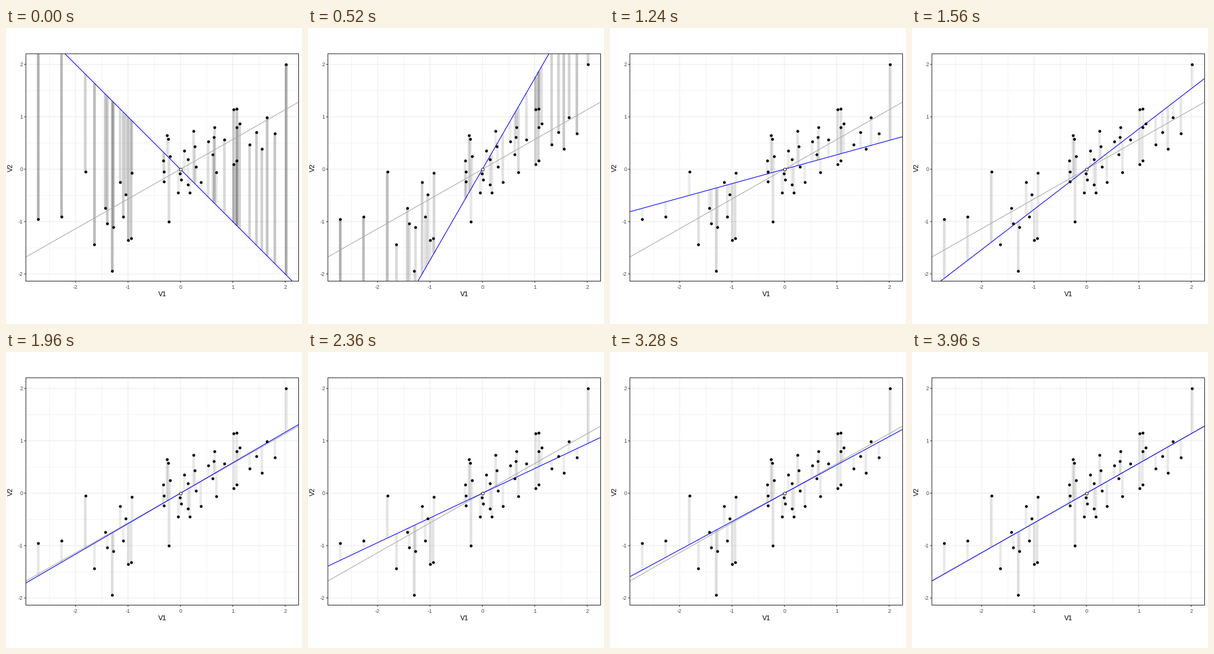
Recreate the animation shown at these times as a matplotlib script. Size 480 by 480 pixels, loop 4 s.

```python
import numpy as np
import matplotlib.pyplot as plt
from matplotlib.animation import FuncAnimation
from matplotlib.collections import LineCollection
from matplotlib.patches import Rectangle

SIZE, DPI = 480, 72          # one point equals one pixel
FRAMES, STEP = 100, 40
UNIT = 84.95                 # pixels per data unit
X0, Y0 = 282.8, 229.0        # pixel position of the origin
LEFT, RIGHT, TOP, BOTTOM = 32.2, 474.5, 41.8, 410.5
FIT = 0.568                  # least squares slope

x = np.array([
    -2.713, -2.270, -1.816, -1.640, -1.436, -1.395, -1.301, -1.277, -1.151,
    -1.090, -1.044, -0.995, -0.942, -0.924, -0.331, -0.315, -0.313, -0.257,
    -0.231, -0.218, -0.200, -0.039, -0.009, 0.012, 0.073, 0.144, 0.144,
    0.179, 0.252, 0.275, 0.291, 0.388, 0.529, 0.620, 0.642, 0.653, 0.687,
    0.840, 1.017, 1.015, 1.068, 1.079, 1.079, 1.129, 1.321, 1.453, 1.553,
    1.656, 1.803, 2.019])
y = np.array([
    -0.957, -0.910, -0.047, -1.442, -0.742, -1.032, -1.940, -1.107, -0.250,
    -0.903, -0.483, -1.354, -1.324, -0.065, 0.160, -0.045, -0.235, 0.645,
    0.579, -1.006, 0.250, -0.443, -0.082, -0.200, 0.351, 0.191, -0.294,
    -0.447, 0.730, 0.441, 0.047, -0.244, 0.532, 0.283, 0.616, 0.798, -0.057,
    0.569, 1.136, 0.097, 0.165, 1.154, 0.800, 0.873, 0.469, 0.706, 0.385,
    0.991, 0.680, 2.007])


def px(u):
    return X0 + UNIT * u


def py(v):
    return Y0 - UNIT * v


def swing():
    """Slopes of a rod turned by vertical springs, with friction."""
    angle, speed, slopes = -45.0, 0.0, []
    for _ in range(FRAMES - 1):
        slope = np.tan(np.radians(angle))
        slopes.append(slope)
        speed = 0.915 * speed + 2.03 * (FIT - slope)
        angle += speed
    return slopes + [FIT]    # the last picture snaps to the fit


slopes = swing()

plt.rcParams["font.family"] = "Liberation Sans"
fig = plt.figure(figsize=(SIZE / DPI, SIZE / DPI), dpi=DPI, facecolor="white")
ax = fig.add_axes([0, 0, 1, 1])
ax.set_xlim(0, SIZE)
ax.set_ylim(SIZE, 0)
ax.axis("off")

panel = Rectangle((LEFT, TOP), RIGHT - LEFT, BOTTOM - TOP,
                  fc="none", ec="#333333", lw=1.07, zorder=8, snap=False)
ax.add_patch(panel)


def line(xs, ys, color, width, z, clip=True):
    art, = ax.plot(xs, ys, color=color, lw=width, zorder=z, snap=False,
                   solid_capstyle="butt")
    if clip:
        art.set_clip_path(panel)
    return art


def label(tx, ty, text, size, color, **kw):
    ax.text(tx, ty, text, fontsize=size, color=color, **kw)


# grid
for k in np.arange(-2.5, 2.1, 0.5):
    width = 1.07 if k == int(k) else 0.53
    z = 1.5 if k == int(k) else 1
    line([px(k)] * 2, [TOP, BOTTOM], "#EBEBEB", width, z)
    if k > -2.2:
        line([LEFT, RIGHT], [py(k)] * 2, "#EBEBEB", width, z)

# axes
for k in range(-2, 3):
    line([px(k)] * 2, [BOTTOM, BOTTOM + 2.75], "#333333", 1.07, 7, False)
    line([LEFT - 2.75, LEFT], [py(k)] * 2, "#333333", 1.07, 7, False)
    label(px(k), 423.0, str(k), 8.8, "#4D4D4D", ha="center", va="baseline")
    label(27.3, py(k) + 3.15, str(k), 8.8, "#4D4D4D", ha="right",
          va="baseline")
label((LEFT + RIGHT) / 2, 435, "V1", 11, "black", ha="center", va="baseline")
label(13.2, (TOP + BOTTOM) / 2, "V2", 11, "black", ha="right", va="center",
      rotation=90, rotation_mode="default")

# springs, fitted line, turning line, data, pivot
springs = LineCollection([], linewidths=4.27, capstyle="butt", zorder=3)
springs.set_snap(False)
ax.add_collection(springs)
springs.set_clip_path(panel)

ends = np.array([-4.0, 4.0])
line(px(ends), py(FIT * ends), "#A9A9A9", 1.07, 4)
rod = line(px(ends), py(ends), "#0000FF", 1.07, 5)
ax.plot(px(x), py(y), "o", color="black", ms=4.6, mew=0, zorder=6)
ax.plot([X0], [Y0], "o", mfc="white", mec="black", ms=4.7, mew=0.8, zorder=7)


def draw(i):
    slope = slopes[i]
    foot = slope * x
    springs.set_segments([[(px(a), py(b)), (px(a), py(c))]
                          for a, b, c in zip(x, y, foot)])
    shade = np.zeros((len(x), 4))
    shade[:, 3] = np.clip(0.05 + 0.07 * np.abs(y - foot), 0, 1)
    springs.set_color(shade)
    rod.set_ydata(py(slope * ends))
    return springs, rod


anim = FuncAnimation(fig, draw, frames=FRAMES, interval=STEP, repeat=True,
                     repeat_delay=0, blit=False)
plt.show()
```
